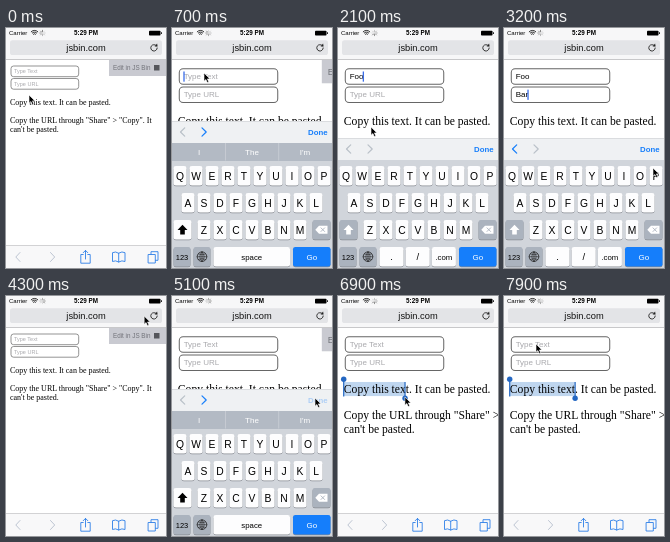
An HTML page for the animation above (8 s loop, 160 by 240 pixels).

```html
<!DOCTYPE html>
<html lang="en">
<head>
<meta charset="utf-8">
<title>Mobile browser demo</title>
<style>
html, body { margin: 0; width: 100%; height: 100%; overflow: hidden; background: #fff; }
svg { display: block; width: 100vw; height: 100vh; }
text { font-family: "Liberation Sans", Arial, sans-serif; white-space: pre; }
.serif text { font-family: "Liberation Serif", Times, serif; font-size: 8px; }
.line { fill: none; stroke-linecap: round; stroke-linejoin: round; }
</style>
</head>
<body>
<svg id="stage" viewBox="0 0 160 240"></svg>
<script>
const LOOP = 8000, ZOOM = 16 / 11, TOP = 32;
const BLUE = '#157efb', GREY = '#b9c0c8', KEY_GREY = '#abb3be';
const stage = document.getElementById('stage');

function add(parent, tag, attrs = {}, content) {
  const el = document.createElementNS('http://www.w3.org/2000/svg', tag);
  set(el, attrs);
  if (content !== undefined) el.textContent = content;
  parent.append(el);
  return el;
}
function set(el, attrs) {
  for (const name in attrs) el.setAttribute(name, attrs[name]);
}
const group = (parent, attrs) => add(parent, 'g', attrs);
const rect = (parent, x, y, width, height, fill, rx = 0) =>
  add(parent, 'rect', { x, y, width, height, fill, rx });
const line = (parent, d, stroke, width = 1) =>
  add(parent, 'path', { d, stroke, 'stroke-width': width, class: 'line' });
const label = (parent, x, y, content, size, fill = '#000', anchor = 'start') =>
  add(parent, 'text', { x, y, 'font-size': size, fill, 'text-anchor': anchor }, content);
const show = (el, on) => set(el, { visibility: on ? 'visible' : 'hidden' });

// Web page, in unzoomed coordinates
const page = group(stage, { id: 'page' });
const highlight = rect(page, 4, 69.1, 0, 9.7, '#bfd6ef');
const fields = ['Type Text', 'Type URL'].map((hint, i) => {
  const y = 38 + i * 12.5;
  const box = rect(page, 5, y, 67.7, 10.7, '#fff', 2.6);
  set(box, { stroke: '#666', 'stroke-width': .7 });
  const text = label(page, 8, y + 7.2, hint, 5.5);
  const caret = rect(page, 8, y + 1.9, .9, 7, '#3c6ee8');
  return { hint, text, caret };
});
const prose = group(page, { class: 'serif' });
['Copy this text. It can be pasted.', 'Copy the URL through "Share" > "Copy". It', "can't be pasted."]
  .forEach((content, i) => add(prose, 'text', { x: 4, y: [76.7, 94.7, 104.4][i] }, content));
const tab = group(page);
rect(tab, 103, 32, 57, 16, '#c9cad1');
label(tab, 107, 42, 'Edit in JS Bin', 6.3, '#73747b');
rect(tab, 148, 37, 5.5, 5.5, '#55565c');
const blank = rect(stage, 0, 32, 160, 186, '#fff');

// Selection handles
const handles = group(stage);
rect(handles, 5.1, 84, 1.2, 16.5, '#2467c2');
add(handles, 'circle', { cx: 5.7, cy: 83.3, r: 2.7, fill: '#2467c2' });
const endHandle = group(handles);
rect(endHandle, -.6, 86, 1.2, 15, '#2467c2');
add(endHandle, 'circle', { cx: 0, cy: 102.2, r: 2.7, fill: '#2467c2' });

// Magnifier
const defs = add(stage, 'defs');
add(add(defs, 'clipPath', { id: 'lens' }), 'circle', { r: 28 });
const shade = add(defs, 'radialGradient', { id: 'shade' });
[[.7, 0], [1, .28]].forEach(([offset, alpha]) =>
  add(shade, 'stop', { offset, 'stop-color': '#000', 'stop-opacity': alpha }));
const loupe = group(stage);
const glass = group(loupe, { 'clip-path': 'url(#lens)' });
add(glass, 'circle', { r: 28, fill: '#fff' });
add(glass, 'use', { href: '#page', transform: 'scale(1.3) translate(-20.6 -93)' });
add(loupe, 'circle', { r: 28, fill: 'url(#shade)', stroke: '#b3b3b3', 'stroke-width': .8 });

// Browser bars
const chrome = group(stage);
rect(chrome, 0, 0, 160, 31.5, '#f7f7f8');
rect(chrome, 0, 31.3, 160, .7, '#b4b4b6');
label(chrome, 3, 7.3, 'Carrier', 6);
[1.4, 2.9, 4.4].forEach(r =>
  line(chrome, `M${28.5 - r * .75} ${7.3 - r * .8}A${r} ${r} 0 0 1 ${28.5 + r * .75} ${7.3 - r * .8}`, '#111', .9));
set(label(chrome, 80, 7.3, '5:29 PM', 6.3, '#000', 'middle'), { 'font-weight': 'bold' });
rect(chrome, 143, 2.7, 11.5, 4.8, '#000', .8);
rect(chrome, 155, 4.2, 1, 1.8, '#000', .4);
const spokes = Array.from({ length: 8 }, (_, i) =>
  set(line(chrome, 'M0-1.3V-2.7', '#555', .7), { transform: `translate(36.5 5) rotate(${i * 45})` })
  || chrome.lastChild);
rect(chrome, 4, 12.3, 152, 14.8, '#e3e4e7', 2.6);
label(chrome, 80, 22.7, 'jsbin.com', 9.3, '#111', 'middle');
line(chrome, 'M150.3 17.6A3.2 3.2 0 1 0 151.2 20', '#222', .9);
add(chrome, 'path', { d: 'M148.6 18.4L151.6 18.6L151.1 15.5Z', fill: '#222' });
rect(chrome, 0, 217.5, 160, 22.5, '#f8f8f9');
rect(chrome, 0, 217.3, 160, .6, '#b8b8ba');
line(chrome, 'M14 224.5L9.8 229L14 233.5M44.5 224.5L48.7 229L44.5 233.5', '#bdc5d2', 1);
line(chrome, 'M77.2 226.5H74.8V235.2H84.2V226.5H81.8M79.5 231V222.5M77.2 224.7L79.5 222.4L81.8 224.7', '#2f80e8', .9);
line(chrome, 'M112.7 225.2Q109.5 223 106.5 224.7V233.5Q109.5 232 112.7 234Q116 232 119 233.5V224.7Q116 223 112.7 225.2V234', '#2f80e8', .9);
line(chrome, 'M142.5 226.5H149.3V235H142.5ZM145 226.3V223.7H152V232.3H149.5', '#2f80e8', .9);

// Keyboard
const keyboard = group(stage);
rect(keyboard, 0, 132, 160, 108, '#d1d5db');
function key(parent, x, y, width, content, size = 10.3, fill = '#fdfdfe', ink = '#000') {
  rect(parent, x, y + .7, width, 19.5, '#888c92', 2.3);
  const cap = rect(parent, x, y, width, 19.5, fill, 2.3);
  if (content) label(parent, x + width / 2, y + 9.8 + size * .36, content, size, ink, 'middle');
  return cap;
}
['QWERTYUIOP', 'ASDFGHJKL', 'ZXCVBNM'].forEach((row, r) =>
  [...row].forEach((letter, i) => key(keyboard, [1.5, 9.5, 25.5][r] + i * 16, 138 + r * 27, 13, letter)));
const shiftCap = key(keyboard, 1.5, 192, 18);
const shiftArrow = add(keyboard, 'path', { d: 'M10.5 196.7L15.5 202H12.8V206.5H8.2V202H5.5Z' });
key(keyboard, 140.5, 192, 18, '', 0, KEY_GREY);
add(keyboard, 'path', { d: 'M143.3 201.7L147 197.7H155.5V205.7H147Z', fill: '#fff' });
line(keyboard, 'M149 199.9L152.6 203.5M152.6 199.9L149 203.5', KEY_GREY, .9);
key(keyboard, 1.5, 219, 17, '123', 7.5, KEY_GREY);
key(keyboard, 21.5, 219, 17, '', 0, KEY_GREY);
add(keyboard, 'circle', { cx: 30, cy: 228.7, r: 4.8, fill: 'none', stroke: '#222', 'stroke-width': .8 });
line(keyboard, 'M25.2 228.7H34.8M30 223.9V233.5M26.4 226Q30 227.6 33.6 226M26.4 231.4Q30 229.8 33.6 231.4M30 223.9Q25.5 228.7 30 233.5Q34.5 228.7 30 223.9', '#222', .6);
key(keyboard, 121, 219, 37.5, 'Go', 8, BLUE, '#fff');

const textKeys = group(keyboard);
key(textKeys, 41.5, 219, 76.5, 'space', 7.8);
rect(textKeys, 0, 114.5, 160, 18.5, '#b3bac4');
["I", 'The', "I'm"].forEach((word, i) => label(textKeys, 27 + i * 53, 127.2, word, 8, '#fff', 'middle'));
rect(textKeys, 53, 115, .6, 17.5, '#d2d6dc');
rect(textKeys, 106.5, 115, .6, 17.5, '#d2d6dc');

const urlKeys = group(keyboard);
['.', '/', '.com'].forEach((word, i) =>
  key(urlKeys, 41.5 + i * 26.2, 219, 24, word, i === 2 ? 7.8 : 9.5));

const accessory = group(keyboard);
rect(accessory, 0, 0, 160, 22, '#eff1f3');
rect(accessory, 0, 0, 160, .5, '#c4c7cb');
const previous = line(accessory, 'M12.7 6.8L8.5 11L12.7 15.2', BLUE, 1.2);
const next = line(accessory, 'M30 6.8L34.2 11L30 15.2', BLUE, 1.2);
const done = label(accessory, 155.5, 13.8, 'Done', 7.8, BLUE, 'end');
set(done, { 'font-weight': 'bold' });

const cursor = add(stage, 'path', {
  d: 'M0 0V8.2L1.9 6.5L3.3 9.6L4.8 8.9L3.4 5.9H6Z',
  fill: '#000', stroke: '#fff', 'stroke-width': .6
});

const clamp = v => Math.max(0, Math.min(1, v));
const ease = v => v * v * (3 - 2 * v);
const ramp = (t, from, to) => ease(clamp((t - from) / (to - from)));
const within = (t, from, to) => t >= from && t < to;
const typed = (word, t, start, step) => word.slice(0, Math.max(0, Math.floor((t - start) / step) + 1));

// time, x, y
const route = [
  [0, 23, 67], [400, 32, 45], [1500, 32, 45], [1900, 33, 99], [2750, 33, 99],
  [3200, 149, 140], [3450, 146, 119], [3750, 146, 119], [4050, 147, 18],
  [4250, 147, 18], [4550, 32, 45], [4750, 32, 45], [5050, 143, 102],
  [5250, 143, 102], [5650, 21, 92], [6300, 21, 92], [6500, 31, 101],
  [7000, 71, 101], [7400, 71, 101], [7850, 32, 48], [LOOP, 32, 48]
];
function cursorAt(t) {
  const i = route.findIndex(stop => stop[0] > t);
  const [a, b] = [route[i - 1], route[i]];
  const k = ramp(t, a[0], b[0]);
  return [a[1] + (b[1] - a[1]) * k, a[2] + (b[2] - a[2]) * k];
}

function draw(t) {
  const reloaded = t >= 4150;
  const zoom = 1 + (ZOOM - 1) * (reloaded ? ramp(t, 4600, 4850) : ramp(t, 400, 650));
  set(page, { transform: `translate(0 ${TOP}) scale(${zoom}) translate(0 ${-TOP})` });
  show(blank, within(t, 4150, 4300));
  set(tab, { opacity: reloaded ? 1 - ramp(t, 5500, 5750) : 1 - ramp(t, 1400, 1700) });

  const focus = within(t, 450, 2200) || within(t, 4600, 5200) ? 0 : within(t, 2200, 3650) ? 1 : -1;
  const values = reloaded ? ['', ''] : [typed('Foo', t, 1050, 200), typed('Bar', t, 2400, 200)];
  fields.forEach(({ hint, text, caret }, i) => {
    const value = values[i];
    text.textContent = value || hint;
    set(text, { fill: value ? '#000' : '#a9a9ad' });
    const width = value ? text.getComputedTextLength() - .5 : -.2;
    set(caret, { x: 8 + width });
    show(caret, focus === i && t % 1000 < 800 && !within(t, 5000, 5200));
  });

  const urlMode = within(t, 2000, 4000);
  const up = reloaded
    ? ramp(t, 4600, 4850) - ramp(t, 5200, 5500)
    : ramp(t, 400, 650) - ramp(t, 3650, 3900);
  set(keyboard, { transform: `translate(0 ${(1 - up) * 148})` });
  show(keyboard, up > 0);
  set(textKeys, { display: urlMode ? 'none' : 'inline' });
  set(urlKeys, { display: urlMode ? 'inline' : 'none' });
  set(accessory, { transform: `translate(0 ${urlMode ? 110 : 93})` });
  set(shiftCap, { fill: urlMode ? KEY_GREY : '#fdfdfe' });
  set(shiftArrow, { fill: urlMode ? '#fff' : '#000' });
  set(previous, { stroke: urlMode && t >= 2200 ? BLUE : GREY });
  set(next, { stroke: urlMode ? GREY : BLUE });
  set(done, { opacity: within(t, 3550, 3650) || within(t, 5050, 5250) ? .3 : 1 });

  const selectionEnd = 21.3 + 27.6 * ramp(t, 6500, 7000);
  set(highlight, { width: t >= 5950 ? selectionEnd - 4 : 0 });
  show(handles, t >= 6350);
  set(endHandle, { transform: `translate(${selectionEnd * ZOOM} 0)` });

  const lens = ramp(t, 5750, 5900) - ramp(t, 6250, 6350);
  show(loupe, lens > 0);
  set(loupe, { transform: `translate(20 ${93 - 28 * lens}) scale(${lens})` });

  const phase = Math.floor(t / 100);
  spokes.forEach((spoke, i) => set(spoke, { opacity: 1 - ((phase - i) % 8 + 8) % 8 * .11 }));
  set(cursor, { transform: `translate(${cursorAt(t)})` });
}

const start = performance.now();
function tick() {
  draw((performance.now() - start) % LOOP);
  requestAnimationFrame(tick);
}
tick();
</script>
</body>
</html>
```
